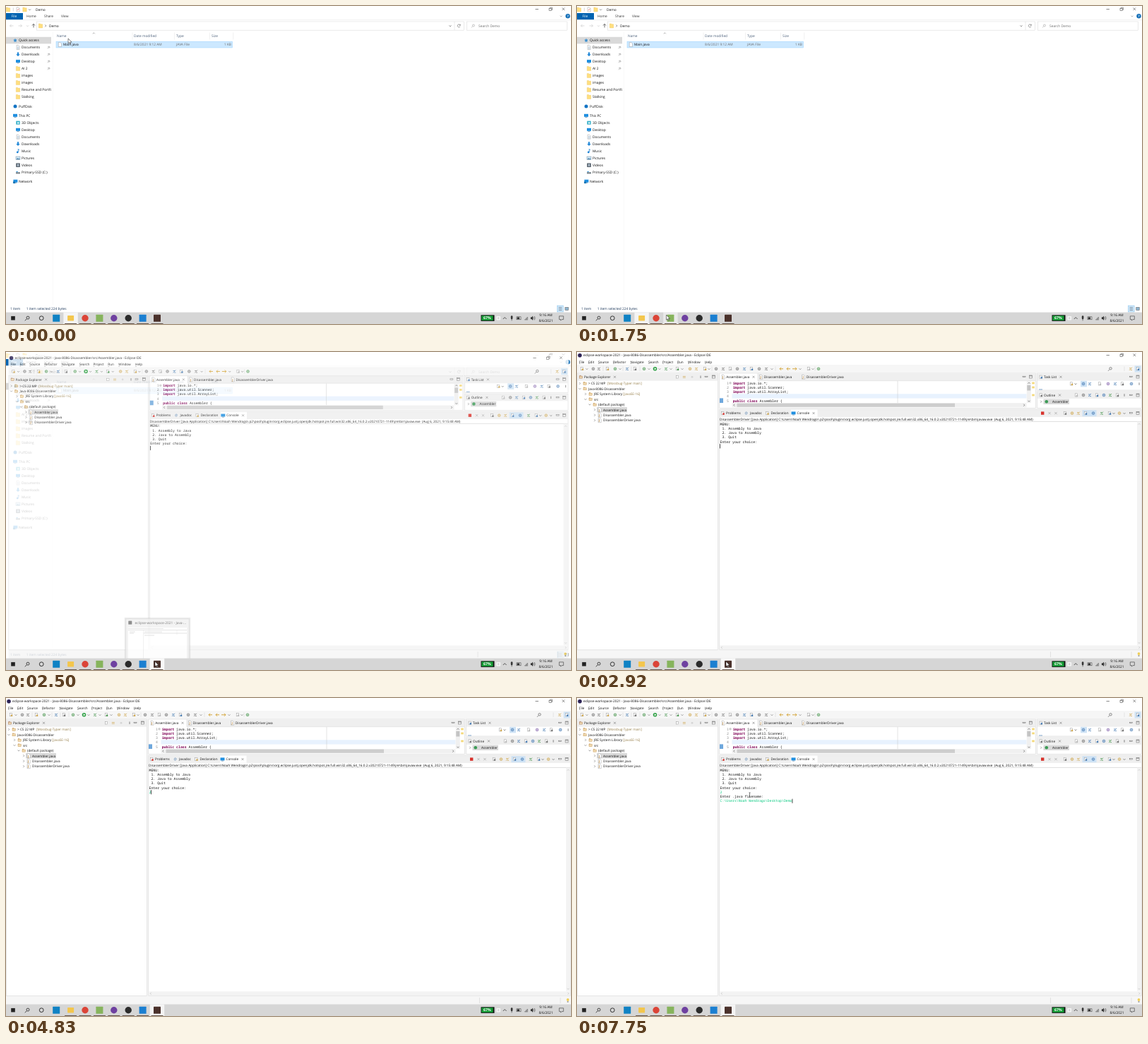
An HTML page for the animation above (8 s loop, 800x450 px).

```html
<!DOCTYPE html>
<html lang="en">
<head>
<meta charset="utf-8">
<title>Screen recording</title>
<style>
html, body { margin: 0; width: 100%; height: 100%; overflow: hidden; background: #fff; }
svg { display: block; width: 100vw; height: 100vh; }
text { font-family: "Open Sans", "Noto Sans", sans-serif; white-space: pre; text-rendering: geometricPrecision; }
text.mono { font-family: "Noto Sans Mono", "DejaVu Sans Mono", monospace; font-size: 4.86px; }
.kw { fill: #7f0055; font-weight: bold; }
</style>
</head>
<body>
<svg id="stage" viewBox="0 0 800 450"></svg>
<script>
// Drawing helpers; text is placed by the centre of its line
const rect = (x, y, w, h, fill, more = '') => `<rect x="${x}" y="${y}" width="${w}" height="${h}" fill="${fill}" ${more}/>`;
const frame = (x, y, w, h, stroke, fill = 'none') => rect(x, y, w, h, fill, `stroke="${stroke}" stroke-width=".5"`);
const dot = (x, y, r, fill, more = '') => `<circle cx="${x}" cy="${y}" r="${r}" fill="${fill}" ${more}/>`;
const path = (d, stroke = '#444', w = .6, fill = 'none') => `<path d="${d}" stroke="${stroke}" stroke-width="${w}" fill="${fill}"/>`;
const text = (x, y, s, fill = '#111', size = 4.85, more = '') =>
  `<text x="${x}" y="${y + 1.7}" fill="${fill}" font-size="${size}" ${more}>${s}</text>`;
const code = (x, y, s, fill = '#111') => `<text class="mono" x="${x}" y="${y + 1.6}" fill="${fill}">${s}</text>`;
const label = (x, y, s, fill) => text(x, y, s, fill, 4.7);
const group = (id, s) => `<g id="${id}">${s}</g>`;

const down = (x, y, c) => path(`M${x - 1.5} ${y - .7}l1.5 1.5 1.5-1.5`, c);
const up = (x, y, c) => path(`M${x - 1.5} ${y + .7}l1.5-1.5 1.5 1.5`, c);
const right = (x, y, c) => path(`M${x - .7} ${y - 1.5}l1.5 1.5-1.5 1.5`, c);
const left = (x, y, c) => path(`M${x + .7} ${y - 1.5}l-1.5 1.5 1.5 1.5`, c);
const cross = (x, y, r = 1.5, c = '#555') => path(`M${x - r} ${y - r}l${2 * r} ${2 * r}m0 ${-2 * r}l${-2 * r} ${2 * r}`, c, .5);
const lens = (x, y, r, c, w = .6) => path(`M${x - r * 1.8} ${y + r * 1.8}l${r * 1.3} ${-r * 1.3}`, c, w) + dot(x + r * .3, y - r * .3, r, 'none', `stroke="${c}" stroke-width="${w}"`);

const folder = (x, y) => path(`M${x - 2.7} ${y - 3}h2.2l.8.8h2.4v5.2h-5.4z`, '#e3b94e', .3, '#ffdf7f');
const page = (x, y) => path(`M${x - 2} ${y - 3}h2.6l1.6 1.6v4.4h-4.2z`, '#8a8a8a', .4, '#fff');
const lined = (x, y) => page(x, y) + path(`M${x - 1.2} ${y - .6}h2.5m-2.5 1.2h2.5m-2.5 1.2h2.5`, '#5b87ad', .4);
const arrowDown = (x, y) => path(`M${x - 1} ${y - 3}h2v2.8h1.7l-2.7 3-2.7-3h1.7z`, 'none', 0, '#1f86d6');
const screen = (x, y) => rect(x - 3, y - 2.4, 6, 4, '#1f8fe0') + path(`M${x - 1.6} ${y + 2.3}h3.2`, '#3b6a92', .6);
const pin = (x, y) => path(`M${x - 1.8} ${y + 1.8}l1.6-1.6m-1.2-1.2l2.3 2.3m-1.2-2.6l1.4 1.4m-1.8-.8l1-1 1.4 1.4-1 1`, '#888', .5);
const cube = (x, y) => rect(x - 2.7, y - 2.5, 5.4, 5, '#35b0c9') + rect(x - 1, y - 1, 2.4, 2.4, '#d8f3f8');
const note = (x, y) => dot(x - .8, y + 1.7, 1.3, '#1c82d4') + path(`M${x + .3} ${y + 1.8}v-4.6l1.6 1.8`, '#1c82d4', .8);
const picture = (x, y) => frame(x - 3, y - 2.2, 6, 4.4, '#7791a5', '#cfe6f5') + path(`M${x - 2.6} ${y + 1.8}l2-2 1.4 1.2 1-.8 1 1.6z`, 'none', 0, '#4f86ab');
const film = (x, y) => rect(x - 2.7, y - 2.7, 5.4, 5.4, '#3c4854') + rect(x - 1.4, y - 1.9, 2.8, 3.8, '#a9b8c4');
const disk = (x, y) => rect(x - 3, y, 6, 2.2, '#7b858c') + rect(x - 2.4, y - 1.4, 2, 1.2, '#2a90d8');
const net = (x, y) => screen(x + .4, y - .4) + dot(x - 1.5, y + 1.2, 1.6, '#1473b5');
const cloud = (x, y) => dot(x, y, 2.5, '#1474c4');
const star = (x, y) => path(`M${x} ${y - 2.8}l.8 1.9 2 .2-1.5 1.4.4 2.1-1.7-1.1-1.7 1.1.4-2.1-1.5-1.4 2-.2z`, 'none', 0, '#3a8fd0');

const caption = () => path('M749.5 4.6h4.4', '#333', .6) + frame(769, 3.3, 3.2, 3.2, '#333') + path('M770.2 3.3v-1.1h3.2v3.2h-1', '#333', .5) + cross(789.3, 4.3, 1.8, '#222');

// File manager window
const side = [
  [star, 18, 48.5, 'Quick access'], [lined, 22, 58.5, 'Documents', 1], [arrowDown, 22, 68.5, 'Downloads', 1],
  [screen, 22, 78.5, 'Desktop', 1], [folder, 22, 88.5, 'AI 2', 1], [folder, 22, 98.5, 'images'], [folder, 22, 108.5, 'images'],
  [folder, 22, 118.5, 'Resume and Portfolio'], [folder, 22, 128.5, 'Stalking'], [cloud, 18, 142, 'PuffDisk'],
  [screen, 18, 155.2, 'This PC'], [cube, 22, 165.2, '3D Objects'], [screen, 22, 175.2, 'Desktop'], [lined, 22, 185.2, 'Documents'],
  [arrowDown, 22, 195.2, 'Downloads'], [note, 22, 205.2, 'Music'], [picture, 22, 215.2, 'Pictures'], [film, 22, 225.2, 'Videos'],
  [disk, 22, 235.2, 'Primary-SSD (C:)'], [net, 18, 248.5, 'Network']
];

function fileWindow() {
  const grey = '#6d6d6d', head = '#4c607a', status = '#1e395b';
  let s = rect(0, 0, 800, 434, '#fff');
  s += group('fileTitle', folder(3, 5) + path('M10.3 2.5v5', '#999', .4) + page(17, 5) + path('M15.8 5l1 1 1.6-2.4', '#c33', .5) +
    folder(26.5, 5) + down(33.5, 5.2) + text(42, 4.8, 'Demo') + caption());
  s += rect(0, 10, 24, 9.3, '#0063b1') + text(7.6, 14.6, 'File', '#fff');
  [[29, 'Home'], [54, 'Share'], [78, 'View']].forEach(([x, n]) => s += text(x, 14.6, n, '#333'));
  s += down(786, 14.4, '#777') + dot(795.5, 14.3, 3.2, '#1570b8') + text(794.4, 14.3, '?', '#fff', 4.6, 'font-weight="bold"');
  s += path('M0 19.7h800', '#e2e2e2', .5);
  s += path('M10.5 28h-5m2-2l-2 2 2 2M17.5 28h5m-2-2l2 2-2 2', '#c4c4c4') + down(30.5, 28.2, '#bbb') + path('M39 30.5v-5m-2 2l2-2 2 2', '#333', .7);
  s += frame(43.7, 22, 604.6, 12.2, '#d6d6d6') + path('M635 22v12', '#d6d6d6', .5) + folder(49, 28) + right(56, 28) + text(61, 28, 'Demo');
  s += down(629, 28.2) + path('M643 27a2 2 0 1 0 .1 1.8m.2-3v1.6h-1.6', '#444', .5);
  s += frame(652.7, 22, 142, 12.2, '#d6d6d6') + lens(661.5, 28, 1.5, '#777', .4) + text(669, 28, 'Search Demo', grey);

  s += rect(0, 43.8, 64, 9.6, '#d9d9d9');
  side.forEach(([icon, x, y, name, pinned]) => {
    s += icon(x - 5, y) + text(x, y, name, '#111', 4.85, 'clip-path="url(#pane)"') + (pinned ? pin(60.5, y) : '');
  });
  s += path('M66.3 37v386', '#f3f3f3', .5);

  [[72, 'Name'], [181, 'Date modified'], [241, 'Type'], [291, 'Size']].forEach(([x, n]) => s += text(x, 42.4, n, head));
  [179, 238.5, 288.5, 321.7].forEach(x => s += path(`M${x} 37.5v10`, '#e2e2e2', .5));
  s += up(124.3, 38.6, '#777') + frame(71, 50.2, 249.6, 8.8, '#99d1ff', '#cce8ff') + page(76.3, 54.6) + text(81, 54.6, 'Main.java');
  s += text(181, 54.6, '8/6/2021 9:12 AM', grey) + text(241, 54.6, 'JAVA File', grey) + text(319, 54.6, '1 KB', grey, 4.85, 'text-anchor="end"');
  s += text(6, 428.6, '1 item', status) + text(28.7, 428.6, '1 item selected', status) + text(64, 428.6, '224 bytes', status);
  s += frame(780.5, 424, 8.6, 9, '#7fbce8', '#cfe8fa') + path('M782.5 426.5h4.6m-4.6 2h4.6m-4.6 2h4.6', '#567', .6);
  return s + frame(791.8, 426.4, 4.4, 4, '#555', '#8db4d0');
}

// IDE window
const tint = { g: '#4f9a55', b: '#4c7fb5', y: '#d0aa55', k: '#777', r: '#d8322c', p: '#8a6bb0', l: '#bdbdbd' };
const glyphs = [
  (x, y, c) => frame(x - 1.8, y - 2.2, 3.2, 4.2, '#999', '#fff') + rect(x - .2, y - .2, 2.4, 2.4, c),
  (x, y, c) => dot(x, y, 1.9, c, `fill-opacity=".45" stroke="${c}" stroke-width=".6"`),
  (x, y, c) => path(`M${x - 2} ${y + 2}l4-4M${x - 2} ${y - 1}h2.6M${x - .4} ${y + 1.6}h2.4`, c, .8)
];
const tool = (x, y, c) => glyphs[0](x, y, c);
const tools = (y, list) => list.split(' ').map((e, i) => glyphs[i % 3](parseFloat(e), y, tint[e.slice(-1)])).join('');
const minMax = (a, b, y) => frame(a - 2, y - .8, 4, 1.4, '#666') + frame(b - 2, y - 2, 4, 4, '#666') + path(`M${b - 2} ${y - 1.2}h4`, '#666', .7);
const javaFile = (x, y) => page(x, y) + text(x - .9, y, 'J', '#b07a2a', 4.2, 'font-weight="bold"');
const box = (x, y, c = '#c9974f') => frame(x - 2, y - 1.2, 4.2, 3, c, '#f0dcb4') + path(`M${x - 2} ${y - 1.9}h2.2`, c, .7);

function ideWindow() {
  const gold = '#957d47', line = '#d2d2d2', trim = '#efefef';
  let s = rect(0, 0, 800, 434, '#f6f6f6') + rect(0, 0, 800, 18, '#fff');
  s += dot(4, 4.7, 2.8, '#2c2255') + text(9, 4.7, 'eclipse-workspace-2021 - Java-8086-Disassembler/src/Assembler.java - Eclipse IDE', '#111', 4.76) + caption();
  const menu = [[3, 'File'], [16, 'Edit'], [30, 'Source'], [51, 'Refactor'], [75.5, 'Navigate'], [101, 'Search'], [121, 'Project'], [142, 'Run'], [157, 'Window'], [181, 'Help']];
  menu.forEach(([x, n]) => s += label(x, 13.9, n) + path(`M${x} 16.5h2`, '#444', .35));
  s += tools(23.8, '7y 23k 31k 43y 54g 71b 82k 95g 126g 142g 160y 169y 181y 197k 207k 217l 227k 237b 247b 258k 268k 328l 342g 784y');
  s += dot(110.5, 23.8, 2.8, '#35a34a') + path('M109.7 22.2l2.6 1.6-2.6 1.6z', 'none', 0, '#fff');
  [14, 61, 102, 117, 133, 149, 187, 276, 316, 334].forEach(x => s += down(x, 24, '#666'));
  s += path('M292 23.8h-5m2-2l-2 2 2 2M302 23.8h-5m2-2l-2 2 2 2M305 23.8h6m-2-2l2 2-2 2', '#d3a02c', .9);
  [37, 65, 77, 89, 191, 281, 337, 775].forEach(x => s += path(`M${x} 20.5v6.5`, '#ccc', .4));
  s += lens(755, 23.8, 1.7, '#444') + rect(789.6, 19.5, 9, 9, '#cfe3f5') + tool(794, 23.8, tint.b);

  // Package tree
  s += frame(.3, 30, 199.2, 391.5, line, '#fff') + rect(.6, 30.3, 198.6, 10.4, trim) + box(5.5, 35.3, '#a9744f') + label(10, 35.3, 'Package Explorer') + cross(53.5, 35.3);
  s += frame(140.3, 33.6, 3.4, 3.4, '#999', '#fff') + path('M149.8 34.5h4m-4 1.8h4', tint.y, .7) + dot(163, 35.3, 1.4, '#d4d4d4');
  s += path('M175 33.5v3.5', '#666', .8) + minMax(183, 193.5, 35);
  s += rect(28, 78, 43, 7.4, '#d9d9d9');
  const tree = [
    [4, 0, '> CS 22 MP', 43, '[Mossbug-Typer main]'], [4, 1, 'Java-8086-Disassembler'], [12, 0, 'JRE System Library', 65, '[JavaSE-16]'],
    [12, 1, 'src'], [18, 1, '(default package)'], [25, 0, 'Assembler.java'], [25, 0, 'Disassembler.java'], [25, 0, 'DisassemblerDriver.java']
  ];
  tree.forEach(([x, open, name, noteX, extra], i) => {
    const y = 44.5 + 7.46 * i;
    s += (open ? down : right)(x, y, '#666') + (i > 4 ? javaFile : box)(x + 7, y) + label(x + 12, y, name);
    if (extra) s += label(noteX, y, extra, gold);
  });

  // Editor
  s += frame(201.8, 30, 447.4, 49.5, line, '#fff') + rect(256, 30.3, 393, 10.4, trim) + path('M256 30v10.7h393', line, .5);
  [[207, 'Assembler.java'], [260.5, 'Disassembler.java'], [320.5, 'DisassemblerDriver.java']].forEach(([x, n]) => s += javaFile(x, 35.3) + label(x + 4.3, 35.3, n));
  s += cross(250, 35.3) + minMax(633, 642.5, 35);
  s += rect(219.5, 59.3, 417, 6.2, '#e8f2fe') + path('M454 41v31', '#c4c4c4', .5) + rect(202, 65.4, 5, 6.6, '#6fa8dc');
  const kw = w => `<tspan class="kw">${w}</tspan>`;
  [kw('import') + ' java.io.*;', kw('import') + ' java.util.Scanner;', kw('import') + ' java.util.ArrayList;', '', kw('public class') + ' Assembler {'].forEach((row, i) => {
    const y = 43.9 + 6.25 * i;
    s += code(212, y, i + 1, '#888') + code(220.7, y, row);
  });
  s += dot(217, 43.9, 1.3, 'none', 'stroke="#888" stroke-width=".4"') + path('M216.2 43.9h1.6', '#666', .4);
  s += rect(636.8, 41, 6, 31, '#f0f0f0') + up(640, 44) + down(640, 69.5) + rect(637.3, 47, 5, 7.5, '#c4c4c4');
  [44, 50, 61].forEach(y => s += rect(644.2, y - 1.4, 3.6, 2.8, '#f4d97c'));
  s += rect(219.5, 72.2, 417, 6, '#f0f0f0') + left(222.5, 75.2) + right(633, 75.2) + rect(226.5, 72.6, 308.5, 5.2, '#cdcdcd');

  // Task list and outline
  s += frame(651.8, 30, 147.7, 24, line, '#fff') + rect(652, 30.3, 147.2, 10.4, trim) + tool(656.8, 35.3, tint.b) + label(661, 35.3, 'Task List') + cross(685, 35.3) + minMax(784.5, 794, 35);
  s += rect(713, 40.8, 9, 8.6, '#cfe3f5') + tools(45, '700y 717b 726b 740l 752p 762b 772k 785b') + down(706, 45.2) + path('M796 43.3v3.5', '#666', .8) + path('M654 53h5', '#4c7fb5', .7);
  s += frame(651.8, 56, 147.7, 23.5, line, '#fff') + rect(652, 56.3, 147.2, 9.6, trim) + tool(656.8, 61, tint.k) + label(661, 61, 'Outline') + cross(683.5, 61);
  s += tools(61, '707l 717k 726b 736b 746b 755g 765k') + path('M775 59.3v3.5', '#666', .8) + minMax(784.5, 794, 61);
  s += rect(660.5, 66.6, 36.5, 7.4, '#d9d9d9') + right(657, 70.3, '#666') + dot(664.8, 70.3, 2.3, '#3b9a55') + label(673, 70.3, 'Assembler');

  // Console
  s += frame(201.8, 81.4, 597.7, 340.1, line, '#fff') + rect(202, 81.7, 597.2, 10.2, trim) + rect(303, 81.7, 37.5, 10.2, '#fff');
  s += tool(206.5, 86.6, tint.r) + label(211, 86.6, 'Problems') + label(237.5, 86.6, '@', '#3b6ea5') + label(245, 86.6, 'Javadoc');
  s += tool(269.5, 86.6, tint.y) + label(274.5, 86.6, 'Declaration') + screen(306.5, 86.8) + label(311.5, 86.6, 'Console') + cross(335, 86.6);
  s += rect(657, 84.4, 4.4, 4.4, '#d8322c') + cross(669, 86.6, 1.7, '#888') + cross(678, 86.6, 1.7, '#888') + rect(715.5, 82.2, 20, 9, '#cfe3f5');
  s += tools(86.6, '691k 701y 710y 720b 731b 743g 754b 768y') + down(760, 86.8) + down(775, 86.8) + minMax(784.5, 794, 86.4);
  s += label(202, 95.2, String.raw`DisassemblerDriver [Java Application] C:\Users\Noah Wendrago\.p2\pool\plugins\org.eclipse.justj.openjdk.hotspot.jre.full.win32.x86_64_16.0.2.v20210721-1149\jre\bin\javaw.exe  (Aug 6, 2021, 9:15:48 AM)`);
  s += path('M202 98.4h597', '#bbb', .5);
  ['MENU:', ' 1. Assembly to Java', ' 2. Java to Assembly', ' 3. Quit', 'Enter your choice:'].forEach((row, i) => s += code(202.5, rowY(i), row));
  s += group('choice', code(202.5, rowY(5), '2', '#00c87d')) + group('prompt', code(202.5, rowY(6), 'Enter .java filename:'));
  s += group('answer', code(202.5, rowY(7), String.raw`C:\Users\Noah Wendrago\Desktop\Demo`, '#00c87d'));
  s += rect(0, -3.1, .7, 6.2, '#000', 'id="caret"');
  s += rect(793, 98.7, 6, 316, '#f3f3f3') + up(796, 102, '#bbb') + down(796, 411.5, '#bbb');
  s += rect(202.3, 415.3, 596.7, 5.9, '#f3f3f3') + left(205, 418.2, '#bbb') + right(796, 418.2, '#bbb');
  return s + path('M670.5 424v8M785 424v8', '#ccc', .5) + dot(795.5, 427, 1.9, '#f0cf5a') + rect(794.6, 429, 1.8, 1.8, '#999');
}

// Hover thumbnail above the taskbar
function thumbnail() {
  let s = rect(169, 377, 91, 62, '#f1f1f1', 'stroke="#bbb" stroke-opacity=".35" stroke-width="2.5"');
  s += rect(173.3, 380.5, 5, 5, '#777', 'rx=".5"') + text(182.5, 383.3, 'eclipse-workspace-2021 - Java-...', '#666') + rect(173, 390, 83, 48, '#fff');
  s += path('M173 391.5h50M173 393.5h83M195 398h61', '#ccc', .6) + path('M175 396h8m-8 2h6M196 396h25M196 401h14', '#bbb', .5);
  return s + path('M194.5 394v44M242 394v6', '#ddd', .5);
}

const cellX = i => 10 + 20.4 * i;
function taskbar() {
  const y = 441.7, dark = '#333';
  let s = rect(0, 433.5, 800, 16.5, '#d6d6d6') + rect(0, 433.5, 20.4, 16.5, '#f4f4f4', 'id="active"') + rect(0, 433.5, 20.4, 16.5, '#fff', 'id="hover" fill-opacity=".5"');
  s += rect(7.2, y - 2.8, 5.6, 5.6, '#222') + lens(30.4, y, 2, '#222', .8) + dot(50.2, y, 2.9, 'none', 'stroke="#222" stroke-width=".9"');
  const square = c => x => rect(x - 5, y - 5, 10, 10, c, 'rx=".5"'), round = c => x => dot(x, y, 4.7, c);
  [square('#0f82c4'), x => rect(x - 4.5, y - 3.7, 9, 7.4, '#f3c64d', 'rx=".6"'), round('#db4437'), square('#86b45c'), round('#6e40a0'), round('#2b2b2b'), square('#1b7fd1'), square('#4a312b')]
    .forEach((icon, i) => s += icon(cellX(i + 3)) + (i ? rect(cellX(i + 3) - 8.5, 449, 17, 1, '#66564c') : ''));
  s += rect(672.5, 437.3, 19, 8.6, '#111') + rect(673.4, 438.2, 16.2, 6.8, '#159a35') + text(676, 441.7, '67%', '#fff', 5.2, 'font-weight="bold"');
  s += rect(694.2, 439, 6, 5.4, '#f4f4f4', 'rx="1"') + path('M697.2 440.2v3m-1.5-1.5h3', '#bbb', .6) + path('M703.8 443l2.4-2.4 2.4 2.4', dark, .8);
  s += rect(714.8, 438.2, 2.6, 5, dark, 'rx="1.2"') + path('M716.1 443v2.4', dark, .6) + frame(723, 439.8, 6, 4, dark) + rect(723.6, 440.4, 3.5, 2.8, dark);
  s += path('M735 444.5v-1.5m1.6 1.5v-3m1.6 3v-4.5', '#555', .9) + path('M743 440.5h1.3l1.7-1.6v5.6l-1.7-1.6h-1.3z', dark, .3, dark) + path('M747 440q1 1.7 0 3.4m1.3-4.4q1.8 2.7 0 5.4', dark, .5);
  s += text(764.5, 437.7, '9:16 AM', '#111', 4.85, 'text-anchor="middle"') + text(764.5, 445.5, '8/6/2021', '#111', 4.85, 'text-anchor="middle"');
  return s + path('M783.3 438.8h6v4.8h-2.4l-1.5 1.5v-1.5h-2.1z', dark, .6);
}

const rowY = i => 101.9 + 6.27 * i;
const pointer = group('arrow', path('M0 0v7l1.7-1.5 1.2 2.6 1.1-.5-1.2-2.5h2.2z', '#111', .5, '#fff')) +
  group('beam', path('M-1.2-3h2.4M0-3v6M-1.2 3h2.4', '#111', .5));

document.getElementById('stage').innerHTML = `<clipPath id="pane">${rect(0, 40, 64, 390, '#000')}</clipPath>` +
  group('files', fileWindow()) + group('ide', ideWindow()) + group('thumb', thumbnail()) + taskbar() + group('pointer', pointer);
const el = id => document.getElementById(id);
const show = (id, on) => el(id).setAttribute('opacity', +on);

// Timing in ms
const LOOP = 8000, STEP = 1000 / 12;
const mouse = [[0, 88, 46], [420, 200, 59.5], [750, 200, 59.5], [1170, 95, 426], [1580, 104, 437], [2170, 211, 438], [3000, 211, 438], [3420, 272, 210], [3670, 244.5, 137], [LOOP, 244.5, 137]];
// from, to, x, console row
const carets = [[2500, 3160, 202.3, 5], [3660, 4160, 202.3, 5], [4660, 4750, 202.3, 5], [4750, 5330, 205.3, 5], [5500, 6080, 202.3, 6], [6580, 6670, 202.3, 7], [6670, 7240, 304.6, 7], [7750, LOOP, 304.6, 7]];

const clamp = v => Math.min(1, Math.max(0, v));
const ramp = (t, a, b) => clamp((t - a) / (b - a));

function mouseAt(t) {
  const i = mouse.findIndex((k, n) => n && t < k[0]);
  const [a, b] = [mouse[i - 1], mouse[i]];
  const p = ramp(t, a[0], b[0]), e = p * p * (3 - 2 * p);
  return [1, 2].map(n => a[n] + (b[n] - a[n]) * e);
}

function draw(ms) {
  const t = Math.min(Math.floor((ms + 4) / STEP) * STEP + 4, LOOP - 1);
  const [x, y] = mouseAt(t), onBar = y > 433.5;

  el('pointer').setAttribute('transform', `translate(${x} ${y})`);
  const inConsole = t > 2500 && x > 202 && y > 98 && y < 420;
  show('arrow', !inConsole);
  show('beam', inConsole);
  show('pointer', t < 4750 || t >= 6580);

  show('fileTitle', t < 2420 ? 1 : .45);
  const open = 1 - (1 - ramp(t, 2430, 2600)) ** 3, size = .95 + .05 * open;
  show('ide', open);
  el('ide').setAttribute('transform', `translate(${400 * (1 - size)} ${433 * (1 - size)}) scale(${size})`);
  show('thumb', t < 2420 ? 0 : .85 * (1 - ramp(t, 2500, 2670)));

  el('active').setAttribute('x', cellX(t < 2500 ? 4 : 10) - 10.2);
  el('hover').setAttribute('x', cellX(Math.round((x - 10) / 20.4)) - 10.2);
  show('hover', onBar);

  show('choice', t >= 4750);
  show('prompt', t >= 5580);
  show('answer', t >= 6670);
  const caret = carets.find(c => t >= c[0] && t < c[1]);
  show('caret', !!caret);
  if (caret) el('caret').setAttribute('transform', `translate(${caret[2]} ${rowY(caret[3])})`);
}

const start = performance.now();
function tick() {
  draw((performance.now() - start) % LOOP);
  requestAnimationFrame(tick);
}
tick();
</script>
</body>
</html>
```
